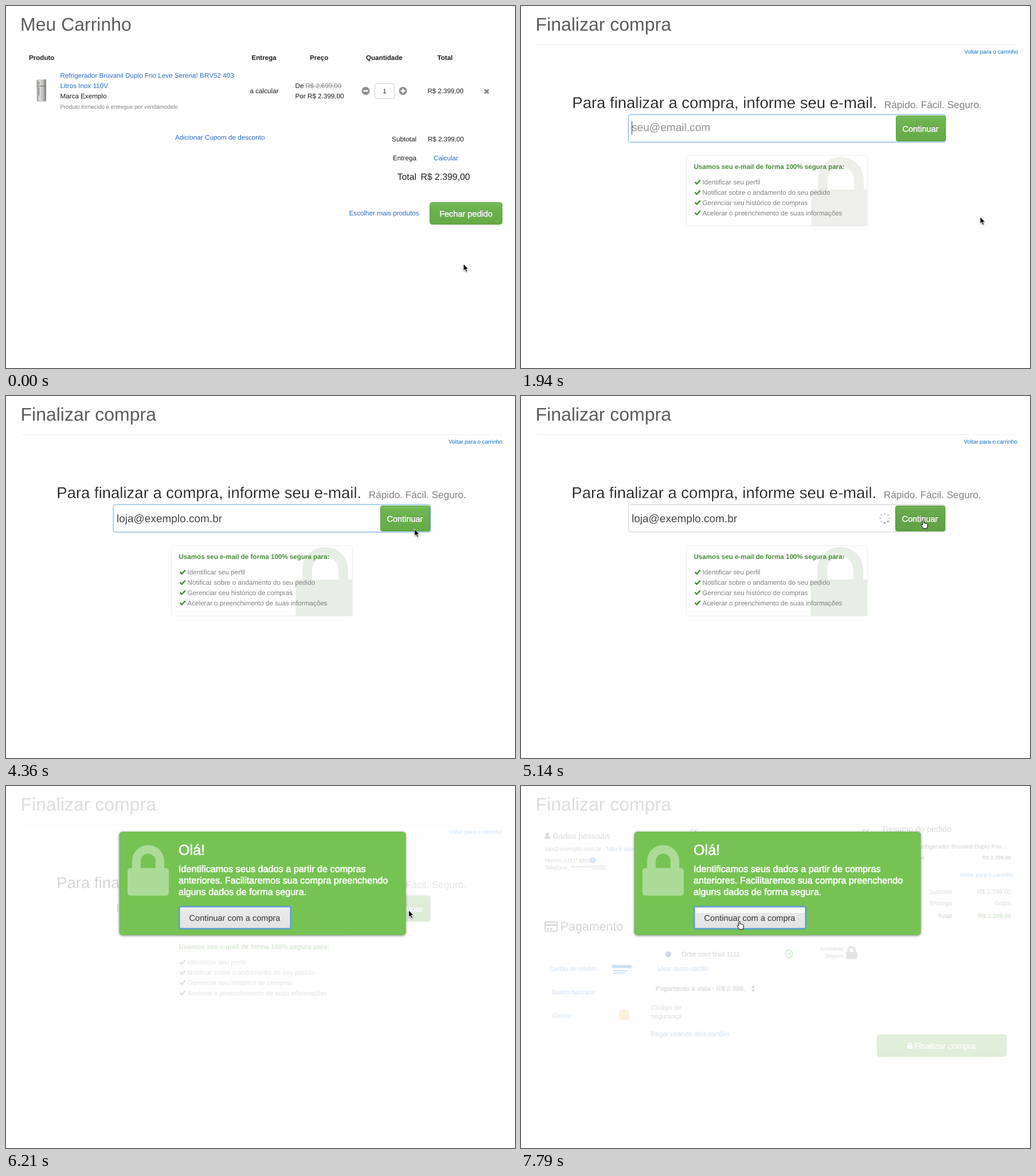
An HTML page for the animation above (8000 ms loop, 888x631 px).

```html
<!DOCTYPE html>
<html lang="pt-BR">
<head>
<meta charset="utf-8">
<title>Finalizar compra</title>
<style>
html, body { margin: 0; width: 100%; height: 100%; overflow: hidden; background: #fefefe; }
svg { display: block; width: 888px; height: 631px; }
text { font-family: "Liberation Sans", Arial, sans-serif; white-space: pre; text-rendering: geometricPrecision; }

/* text styles */
.base { font-size: 11.7px; fill: #1c1c1c; }
.bold { font-size: 11.6px; font-weight: bold; }
.tiny { font-size: 9.8px; }
.big { font-size: 15.8px; }
.title { font-size: 32px; fill: #5c5c5c; }
.thin { stroke: #fefefe; stroke-width: .3px; }
.mid { fill: #fff; stroke: #fff; stroke-width: .6px; }
.link { fill: #2a6bcb; }
.web { fill: #0b6fd0; }
.grey { fill: #808080; }
.soft { fill: #555; }
.green { fill: #468c37; }
.end { text-anchor: end; }
.middle { text-anchor: middle; }
.label { font-size: 14.5px; text-shadow: 0 -1px 0 #0003; }
.btn { fill: url(#leaf); stroke: #5a9a3d; }
.tick { fill: none; stroke: #468c37; stroke-width: 2.4px; }
.field { fill: #fff; stroke: #ccc; }

/* timeline: 1% = 80 ms */
[id|=a] { animation: 8s linear infinite both; }
#a-cart { animation-name: cart; }
#a-title { animation-name: enter; }
#a-form { animation-name: form; }
#a-nudge { animation-name: nudge; animation-timing-function: step-end; }
#a-mark { animation-name: mark; animation-timing-function: step-end; }
#a-buy { animation-name: buy; }
#a-go { animation-name: go; }
#a-focus { animation-name: focus; }
#a-busy { animation-name: busy; animation-timing-function: step-end; }
#a-pay { animation-name: pay; }
#a-veil { animation-name: veil; }
#a-modal { animation-name: modal; }
#a-shine { animation-name: shine; }
#a-pointer { animation-name: pointer; animation-timing-function: ease-in-out; }
#a-hand { animation-name: hand; animation-timing-function: step-end; }
#a-arrow { animation-name: arrow; animation-timing-function: step-end; }
#dots { transform-origin: 634.5px 213px; animation: spin 1s steps(8) infinite; }
#a-focus { stroke: #85bbea; filter: drop-shadow(0 0 1.5px #52a8ec99); }

@keyframes cart { 0%, 17.75% { opacity: 1 } 20%, 100% { opacity: 0 } }
@keyframes enter { 0%, 20% { opacity: 0 } 23.6%, 100% { opacity: 1 } }
@keyframes form { 0%, 20% { opacity: 0 } 23.6%, 95.25% { opacity: 1 } 97.35%, 100% { opacity: 0 } }
@keyframes nudge { 0% { transform: translateX(1px) } 25%, 100% { transform: none } }
@keyframes mark { 0% { color: #eeeeeb } 25% { color: #e7eee6 } 70.6%, 100% { color: #fefefe } }
@keyframes buy { 0%, 3.2% { opacity: 0 } 4.375%, 12.5% { opacity: .07 } 13.2%, 14% { opacity: .17 } 15%, 100% { opacity: .07 } }
@keyframes go { 0%, 55% { opacity: 0 } 56%, 57.4% { opacity: .06 } 58%, 59.2% { opacity: .17 } 60.5%, 100% { opacity: .06 } }
@keyframes focus { 0%, 57.4% { opacity: 1 } 59.6%, 100% { opacity: 0 } }
@keyframes busy { 0% { opacity: 0 } 58.9%, 100% { opacity: 1 } }
@keyframes pay { 0%, 95.25% { opacity: 0 } 97.35%, 100% { opacity: 1 } }
@keyframes veil { 0%, 67.875% { opacity: 0 } 70.6%, 100% { opacity: .8 } }
@keyframes modal {
  0%, 75.5% { opacity: 0; transform: translateY(-220px); animation-timing-function: ease-out }
  77.6%, 100% { opacity: 1; transform: none }
}
@keyframes shine { 0%, 87.6% { opacity: 0 } 89.5%, 100% { opacity: 1 } }
@keyframes spin { to { transform: rotate(360deg) } }
@keyframes pointer {
  0%, .75% { transform: translate(797.5px, 449px) }
  4.375%, 47.25% { transform: translate(800.5px, 367px) }
  56.6%, 82.1% { transform: translate(702px, 216px) }
  91.6%, 92.2% { transform: translate(384px, 235px) }
  93%, 100% { transform: translate(381px, 235px) }
}
@keyframes hand { 0% { opacity: 0 } 3.2% { opacity: 1 } 17.75% { opacity: 0 } 55% { opacity: 1 } 68.5% { opacity: 0 } 87.6%, 100% { opacity: 1 } }
@keyframes arrow { 0% { opacity: 1 } 3.2% { opacity: 0 } 17.75% { opacity: 1 } 55% { opacity: 0 } 68.5% { opacity: 1 } 87.6%, 100% { opacity: 0 } }
</style>
</head>
<body>
<svg viewBox="0 0 888 631">
  <defs>
    <linearGradient id="leaf" x2="0" y2="1">
      <stop stop-color="#76bf58"/><stop offset=".2" stop-color="#6db450"/><stop offset="1" stop-color="#65aa47"/>
    </linearGradient>
    <linearGradient id="steel">
      <stop stop-color="#8d8d8b"/><stop offset=".3" stop-color="#dededc"/><stop offset=".7" stop-color="#b9b9b7"/><stop offset="1" stop-color="#777"/>
    </linearGradient>
    <linearGradient id="plain" x2="0" y2="1">
      <stop stop-color="#f0f0f0"/><stop offset=".3" stop-color="#e8e8e8"/><stop offset="1" stop-color="#e3e3e3"/>
    </linearGradient>
    <g id="lock">
      <path d="M15.5 40V28a20.5 20.5 0 0 1 41 0V40" fill="none" stroke="currentColor" stroke-width="15"/>
      <rect y="40" width="72" height="48" rx="5" fill="currentColor"/>
    </g>
    <path id="tick" class="tick" d="M0 4l3.2 3 6-6.4"/>
  </defs>
  <rect width="888" height="631" fill="#fefefe"/>

  <g id="a-cart" class="base">
    <text class="title" x="25" y="43">Meu Carrinho</text>
    <g class="bold">
      <text x="40" y="94">Produto</text>
      <text x="428.500" y="94">Entrega</text>
      <text x="530" y="94">Preço</text>
      <text x="628" y="94">Quantidade</text>
      <text x="752.500" y="94">Total</text>
    </g>
    <path d="M53.500 130l2-2h14.500v37l-2 1.500H54z" fill="url(#steel)"/>
    <path d="M54 139.500h16M57.500 132v5M57.500 142v14" stroke="#666" fill="none"/>
    <text class="link" x="94.500" y="125">Refrigerador Bruvanil Duplo Frio Leve Serena! BRV52 403</text>
    <text class="link" x="94.500" y="143">Litros Inox 110V</text>
    <text x="94.500" y="161">Marca Exemplo</text>
    <text class="tiny grey" x="94.500" y="178.500">Produto fornecido e entregue por vendamodelo</text>
    <text x="425.500" y="152">a calcular</text>
    <text x="504.500" y="143">De</text>
    <text class="grey" x="522.500" y="143" font-size="11.5">R$ 2.699,00</text>
    <path d="M523 139.500h62" stroke="#999"/>
    <text x="504.500" y="161">Por R$ 2.399,00</text>
    <g fill="#8e8e8e"><circle cx="627.500" cy="148" r="7"/><circle cx="692.500" cy="148" r="7"/></g>
    <path d="M623.500 148h8M688.500 148h8M692.500 144v8" stroke="#fff" stroke-width="2.400"/>
    <rect class="field" x="643.500" y="135.500" width="34" height="26" rx="3"/>
    <text class="middle" x="660.500" y="152" font-size="11">1</text>
    <text x="735.500" y="152" font-size="11.5">R$ 2.399,00</text>
    <path d="M835 145.500l7 7m0-7l-7 7" stroke="#888" stroke-width="3"/>
    <text class="link" x="295" y="233">Adicionar Cupom de desconto</text>
    <text class="end" x="716" y="235.500">Subtotal</text>
    <text x="736" y="235.500" font-size="11.5">R$ 2.399,00</text>
    <text class="end" x="716" y="268.500">Entrega</text>
    <text class="link" x="746" y="268.500">Calcular</text>
    <text class="big end" x="716" y="303">Total</text>
    <text class="big" x="723.500" y="303">R$ 2.399,00</text>
    <text class="link" x="598.500" y="364.500">Escolher mais produtos</text>
    <rect class="btn" x="739.500" y="342.500" width="126" height="38" rx="4"/>
    <rect id="a-buy" x="739" y="342" width="127" height="39" rx="4"/>
    <text class="mid label middle" x="802.500" y="367">Fechar pedido</text>
  </g>

  <text id="a-title" class="title" x="25.500" y="43">Finalizar compra</text>

  <g id="a-form" class="base">
    <path d="M27 67.500H866" stroke="#eee"/>
    <rect x="288.500" y="260.500" width="316" height="123" rx="4" fill="#fefefe" stroke="#eee"/>
    <rect class="field" x="187.500" y="189.500" width="553" height="47.500" rx="4"/>
    <rect id="a-focus" class="field" x="187.500" y="189.500" width="553" height="47.500" rx="4"/>
    <g id="a-nudge">
      <text class="web tiny end" x="866" y="82.500">Voltar para o carrinho</text>
      <text class="thin" x="88.300" y="178" font-size="27.500">Para finalizar a compra, informe seu e-mail.</text>
      <text class="grey" x="632.800" y="178" font-size="17.200">Rápido. Fácil. Seguro.</text>
      <rect class="btn" x="653.500" y="191.500" width="86" height="44" rx="3"/>
      <rect id="a-go" x="653" y="191" width="87" height="45" rx="3"/>
      <text class="mid label middle" x="696" y="219">Continuar</text>
      <g id="a-mark">
        <path d="M525.500 320V303a31.500 31.500 0 0 1 63 0V320" fill="none" stroke="currentColor" stroke-width="17"/>
        <path d="M505.500 320H604V383H505.500z" fill="currentColor"/>
      </g>
    </g>
    <text id="hint" x="193" y="218" font-size="19.100" fill="#909090">seu@email.com</text>
    <text id="mail" x="193" y="219.500" font-size="19" fill="#444"></text>
    <path id="caret" d="M.5 201V224" stroke="#333"/>
    <g id="a-busy">
      <g id="dots" fill="none" stroke-width="3" stroke-linecap="round">
        <circle cx="634.500" cy="213" r="8" stroke="#c4c4c4" stroke-dasharray="0 6.283"/>
        <path d="M642.500 213A8 8 0 0 1 634.500 221" stroke="#8a8a8a" stroke-dasharray="0 6.283"/>
      </g>
    </g>
    <text class="bold green" x="301.500" y="283.500">Usamos seu e-mail de forma 100% segura para:</text>
    <g class="grey" font-size="11.650">
      <text x="316.500" y="311">Identificar seu perfil</text>
      <text x="316.500" y="329">Notificar sobre o andamento do seu pedido</text>
      <text x="316.500" y="346.500">Gerenciar seu histórico de compras</text>
      <text x="316.500" y="364.500">Acelerar o preenchimento de suas informações</text>
    </g>
    <use href="#tick" x="303.500" y="303"/>
    <use href="#tick" x="303.500" y="321"/>
    <use href="#tick" x="303.500" y="338.500"/>
    <use href="#tick" x="303.500" y="356.500"/>
  </g>

  <g id="a-pay" class="base">
    <g class="soft">
      <circle cx="46" cy="84.500" r="3"/>
      <path d="M41 92c0-4 2-5 5-5s5 1 5 5z"/>
      <text x="55" y="91.500" font-size="14.200">Dados pessoais</text>
      <text x="631" y="80" font-size="14.300">Resumo do pedido</text>
    </g>
    <g class="soft" font-size="10.200">
      <text x="41.500" y="112.500">loja@exemplo.com.br - <tspan class="web">Não é você?</tspan></text>
      <text x="41.500" y="133" font-size="10.500">Nome: LOJ* Mod</text>
      <text x="41.500" y="146" font-size="10.500">Telefone: *********0000</text>
    </g>
    <circle cx="125.500" cy="129.500" r="5" fill="#0b74d8"/>
    <text class="middle" x="125.500" y="133" font-size="9" font-weight="bold" style="fill:#fff">?</text>
    <path d="M305 77v8h-8v-9h5M301 81l6-7M605 77v8h-8v-9h5M601 81l6-7" fill="none" stroke="#3b8edb" stroke-width="1.500"/>

    <text class="end" x="848.500" y="108.500" font-size="10.300">Refrigerador Bruvanil Duplo Frio…</text>
    <g class="end">
      <text x="704" y="128" font-size="9.300">1 unidades</text>
      <text x="855" y="128" font-size="9.300" font-weight="bold" class="soft">R$ 2.399,00</text>
      <text class="web tiny" x="859" y="158">Voltar para o carrinho</text>
      <g class="soft" font-size="10.900">
        <text x="751.500" y="187.500">Subtotal</text><text x="855" y="187.500">R$ 2.399,00</text>
        <text x="751.500" y="208">Entrega</text><text x="855" y="208">Grátis</text>
      </g>
      <g font-size="10.500" font-weight="bold">
        <text x="751.500" y="229.500" class="soft">Total</text><text x="855" y="229.500" class="green">R$ 2.399,00</text>
      </g>
      <g class="soft" font-size="9.700">
        <text x="562.500" y="287">Ambiente</text><text x="562.500" y="299">Seguro</text>
      </g>
    </g>
    <use href="#lock" transform="translate(567 279) scale(.27 .255)" color="#777"/>

    <rect x="42" y="237" width="21" height="16" rx="2" fill="none" stroke="#444" stroke-width="2"/>
    <path d="M42 242.500h21M45 249h4m2 0h3" stroke="#444" stroke-width="3"/>
    <text x="68.500" y="252" font-size="21.500" fill="#333">Pagamento</text>

    <circle cx="257" cy="293.500" r="5" fill="#24408e"/>
    <text x="280" y="296.500" font-size="11.600" fill="#223">Orbe com final 1111</text>
    <circle cx="467.500" cy="292.500" r="6.500" fill="none" stroke="#3fae3a" stroke-width="2"/>
    <path d="M464.500 292.500l2.300 2.500 4-5" fill="none" stroke="#3fae3a" stroke-width="2"/>
    <g class="web">
      <text x="50" y="322" font-size="10.700">Cartão de crédito</text>
      <text x="54.500" y="362.500" font-size="10.800">Boleto bancário</text>
      <text x="54.500" y="403.500" font-size="10.800">Gironu</text>
      <text x="238.500" y="322" font-size="11.500">Usar outro cartão</text>
      <text x="226.500" y="435.500" font-size="11.600">Pagar usando dois cartões</text>
      <path d="M159 312h34v5.500h-34zM161 321h24v2h-24zM161 325h20v2h-20z"/>
    </g>
    <rect x="171" y="390" width="18" height="18" fill="#e6bd5c"/>
    <text x="234.500" y="357" font-size="11.600">Pagamento à vista - R$ 2.399,</text>
    <path d="M402 352l3-4 3 4zM402 355l3 4 3-4z" fill="#222"/>
    <g class="soft" font-size="11.500">
      <text x="227" y="390">Código de</text><text x="227" y="404.500">segurança</text>
    </g>
    <rect class="btn" x="621.500" y="433.500" width="225" height="38" rx="4"/>
    <use href="#lock" transform="translate(674 447) scale(.125)" color="#fff"/>
    <text class="mid label" x="686" y="458">Finalizar compra</text>
  </g>

  <rect id="a-veil" width="888" height="631" fill="#fefefe"/>

  <g id="a-modal">
    <rect x="198" y="80" width="499" height="179.500" rx="5" fill="#76c353" stroke="#69b348" stroke-width=".6" style="filter:drop-shadow(0 1px 2px #0007)"/>
    <use href="#lock" x="212" y="103" color="#acdb98"/>
    <g class="mid">
      <text x="301" y="120" font-size="25.200">Olá!</text>
      <g font-size="16.200">
        <text x="301" y="149.500">Identificamos seus dados a partir de compras</text>
        <text x="301" y="169.500">anteriores. Facilitaremos sua compra preenchendo</text>
        <text x="301" y="190">alguns dados de forma segura.</text>
      </g>
    </g>
    <rect x="302.500" y="210.500" width="194" height="38" rx="2" fill="url(#plain)" stroke="#5c9bd6" stroke-width="2" style="filter:drop-shadow(0 0 1px #5c9bd6)"/>
    <rect id="a-shine" x="304" y="212" width="191" height="9" fill="#fdfdfd"/>
    <text class="middle" x="399" y="234.500" font-size="14.500" fill="#333">Continuar com a compra</text>
  </g>

  <g id="a-pointer">
    <path id="a-arrow" d="M.5.500V12.500l2.700-2.400 1.900 4.500 2.200-.900-1.900-4.300H9z" stroke="#fff" stroke-width=".9" style="filter:drop-shadow(0 1px 1px #0005)"/>
    <path id="a-hand" d="M-1.500 9V2c0-2 2.500-2 2.500 0v4c.500-1 2-.700 2.200.300.700-.900 2-.500 2.200.500.900-.600 2.100 0 2.100 1.200 0 3-.500 4-1.500 7H0c-1-2-2.500-3.500-3.700-5.500-.700-1.300.700-2 2.200-.500z" fill="#fff" stroke="#000"/>
  </g>
</svg>
<script>
const MAIL = 'loja@exemplo.com.br';
const [hint, mail, caret] = ['hint', 'mail', 'caret'].map(id => document.getElementById(id));
const within = (t, from, to) => t >= from && t < to;

// letters come in two bursts with a short pause between
function typedCount(t) {
  if (t < 2280) return 0;
  if (t < 3120) return Math.min(16, 1 + Math.round(Math.floor((t - 2280) / 60) * 1.25));
  return Math.min(MAIL.length, 17 + Math.floor((t - 3120) / 60));
}

let start;
function draw(now) {
  start ??= now;
  const t = (now - start) % 8000;
  const count = typedCount(t);
  mail.textContent = MAIL.slice(0, count);
  hint.style.opacity = count ? 0 : 1;
  caret.style.opacity = within(t, 0, 3840) || within(t, 4400, 4590) ? 1 : 0;
  caret.setAttribute('transform', `translate(${Math.round(193 + mail.getComputedTextLength())})`);
  requestAnimationFrame(draw);
}
requestAnimationFrame(draw);
</script>
</body>
</html>
```
